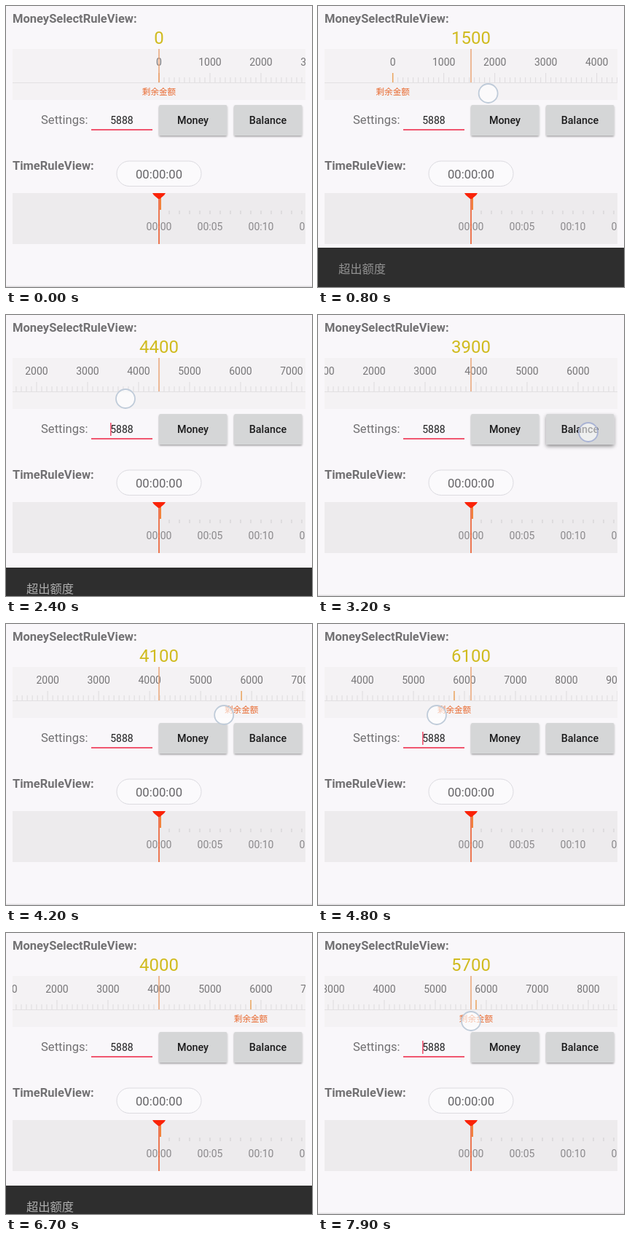
An HTML page for the animation above (8000 ms loop, 420x386 px).

```html
<!DOCTYPE html>
<html lang="en">
<head>
<meta charset="utf-8">
<title>Rule views</title>
<style>
  html, body { margin: 0; width: 100%; height: 100%; overflow: hidden; background: #f9f7fa; }
  svg { display: block; width: 420px; height: 386px; font-family: Roboto, sans-serif; }
  .mid { text-anchor: middle; }
  .title { font-size: 16.5px; font-weight: 700; fill: #727173; }
  .label { font-size: 14px; text-anchor: middle; fill: #777678; }
  .button { font-size: 14.3px; font-weight: 500; text-anchor: middle; fill: #1b1b1c; }
  .cjk { font-family: "Noto Sans CJK SC", "Noto Sans CJK", sans-serif; }
</style>
</head>
<body>
<svg viewBox="0 0 420 386">
  <defs>
    <clipPath id="moneyClip"><rect x="9" y="59" width="402" height="70"/></clipPath>
    <clipPath id="timeClip"><rect x="9" y="257" width="402" height="70"/></clipPath>
    <filter id="shadow" x="-10%" y="-20%" width="120%" height="150%">
      <feDropShadow dx="0" dy="1.5" stdDeviation="1.3" flood-color="#000" flood-opacity=".35"/>
    </filter>
    <filter id="raised" x="-10%" y="-20%" width="120%" height="150%">
      <feDropShadow dx="0" dy="2.5" stdDeviation="2.6" flood-color="#000" flood-opacity=".42"/>
    </filter>
  </defs>
  <rect width="420" height="386" fill="#f9f7fa"/>
  <rect y="384.5" width="420" height="1.5" fill="#dfdde0"/>

  <text class="title" x="9" y="23">MoneySelectRuleView:</text>
  <text id="value" class="mid" x="210" y="52" font-size="24" fill="#d0bb1f"></text>
  <rect x="9" y="59" width="402" height="70" fill="#f4f2f4"/>
  <g clip-path="url(#moneyClip)">
    <path d="M9 105.5H411" stroke="#e2e0e2"/>
    <path id="ticks" stroke="#dddbdd" fill="none"/>
    <g id="labels"></g>
    <g id="balance">
      <path d="M0 92V105" stroke="#eba45e" stroke-width="1.5"/>
      <text class="mid cjk" y="122" font-size="11.6" fill="#e8692f">剩余金额</text>
    </g>
    <path d="M210 59V105" stroke="#eba678" stroke-width="1.5"/>
  </g>

  <text x="48" y="162" font-size="16.6" fill="#727173">Settings:</text>
  <text class="mid" x="159" y="162" font-size="14" fill="#1f1f20">5888</text>
  <rect x="117" y="169" width="84" height="2" fill="#f0566f"/>
  <rect id="cursor" x="143" y="148" width="1.6" height="18" fill="#ee5570"/>
  <rect x="210" y="136" width="93.5" height="42" rx="2" fill="#d5d6d7" filter="url(#shadow)"/>
  <text class="button" x="256.5" y="162">Money</text>
  <rect id="balanceButton" x="313" y="136" width="93.5" height="42" rx="2" fill="#d5d6d7"/>
  <text class="button" x="359.5" y="162">Balance</text>

  <text class="title" x="9" y="225">TimeRuleView:</text>
  <rect x="152" y="213" width="116" height="34.5" rx="17.2" fill="#fbfafc" stroke="#dcdbe0"/>
  <text class="mid" x="210" y="236.500" font-size="16.6" fill="#656467">00:00:00</text>
  <rect x="9" y="257" width="402" height="70" fill="#edebed"/>
  <g clip-path="url(#timeClip)">
    <path id="minutes" stroke="#cfcdcf" fill="none"/>
    <g id="hours"></g>
    <path d="M212 262V280" stroke="#f1823c" stroke-width="2"/>
    <path d="M210 257V327" stroke="#ec5a2b" stroke-width="1.6"/>
    <path d="M201 257H219L217 260L211 265H209L203 260Z" fill="#fa2308"/>
  </g>

  <g id="snackbar">
    <rect y="331" width="420" height="56" fill="#2e2e2e"/>
    <text id="message" class="cjk" x="28" y="365.500" font-size="16.3" fill="#f3f3f3">超出额度</text>
  </g>
  <circle id="touch" r="13" fill="#fff" fill-opacity=".6" stroke="#bfcbd9" stroke-width="1.8"/>
</svg>
<script>
const LOOP = 8000, STEP = 100, CENTER = 210, SCALE = 0.07;
const $ = id => document.getElementById(id);
const set = (id, attrs) => {
  for (const [name, val] of Object.entries(attrs)) $(id).setAttribute(name, val);
};

function tween(keys, t) {
  const i = keys.findIndex(key => key[0] >= t);
  if (i === 0) return keys[0][1];
  if (i < 0) return keys[keys.length - 1][1];
  const [t0, a] = keys[i - 1], [t1, b] = keys[i];
  return a + (b - a) * (t - t0) / (t1 - t0);
}

const MONEY = [
  [300, 0], [400, 60], [700, 1100], [1000, 2400], [1300, 3371], [1600, 4200], [1900, 4600],
  [2200, 4600], [2700, 4100], [3100, 3900], [4100, 3900], [4400, 4750], [4800, 6129],
  [5000, 6400], [5700, 6400], [6100, 5000], [6400, 4120], [6600, 4000],
  [7300, 4000], [7400, 4080], [7900, 5700]
];
const CURSOR = [200, 800, 1400, 1900, 2400, 3000, 3500, 4200, 4700, 5200, 5700, 6300, 6900, 7400, 7900];

// x is the finger position when the ruler stands at the value "at".
const DRAGS = [
  { from: 400, to: 1400, x: 105, at: 3371, y: [108, 138] },
  { from: 2300, to: 2800, x: 150, at: 4600, y: [115, 115] },
  { from: 4200, to: 5000, x: 163, at: 6129, y: [125, 125] },
  { from: 5700, to: 6300, x: 127, at: 6400, y: [99, 108] },
  { from: 7400, to: 8000, x: 210, at: 5700, y: [121, 121] }
];
const TAP = { from: 3200, to: 3500, x: 371, y: [161, 161] };
const FADE = 200;

const SHOW = [[0, 55], [100, 24], [200, 4], [300, 1], [400, 0]];
const HIDE = [[0, 0], [100, 3], [200, 16], [300, 37], [400, 51], [500, 55]];
const SNACKS = [{ show: 500, hide: 2200 }, { show: 4800, hide: 6500 }];

const money = t => tween(MONEY, t);
const toX = (amount, v) => CENTER + (amount - v) * SCALE;

function drawMoney(t) {
  const v = money(t);
  $("value").textContent = Math.floor(v / 100 + 1e-6) * 100;
  let path = "", labels = "";
  const first = Math.max(0, Math.floor((v - 3300) / 100));
  const last = Math.ceil((v + 3300) / 100);
  for (let n = first; n <= last; n++) {
    const x = toX(n * 100, v).toFixed(2), major = n % 10 === 0;
    path += `M${x} ${major ? 92 : 98}V105`;
    if (major) labels += `<text class="label" x="${x}" y="82">${n * 100}</text>`;
  }
  set("ticks", { d: path });
  $("labels").innerHTML = labels;
  set("balance", { transform: `translate(${toX(t < 3400 ? 0 : 5800, v)} 0)` });
}

function drawTouch(t) {
  const g = [...DRAGS, TAP].find(d => t >= d.from && t < d.to + FADE);
  if (!g) return set("touch", { opacity: 0 });
  const held = Math.min(t, g.to);
  const x = g.at === undefined ? g.x : g.x + (g.at - money(held)) * SCALE;
  const y = g.y[0] + (g.y[1] - g.y[0]) * (held - g.from) / (g.to - g.from);
  set("touch", {
    cx: x, cy: y,
    opacity: 1 - (t - held) / FADE,
    stroke: g === TAP ? "#a9b3d4" : "#bfcbd9"
  });
}

function drawSnackbar(t) {
  const s = SNACKS.find(k => t > k.show && t < k.hide + 500);
  set("snackbar", { visibility: s ? "visible" : "hidden" });
  if (!s) return;
  const hiding = t > s.hide;
  const offset = hiding ? tween(HIDE, t - s.hide) : tween(SHOW, t - s.show);
  const alpha = hiding
    ? tween([[0, 1], [200, 0.65], [400, 0]], t - s.hide)
    : tween([[100, 0], [200, 0.25], [500, 1]], t - s.show);
  set("snackbar", { transform: `translate(0 ${offset})` });
  set("message", { opacity: alpha });
}

function draw(t) {
  drawMoney(t);
  drawTouch(t);
  drawSnackbar(t);
  const toggles = CURSOR.filter(time => time <= t).length;
  set("cursor", { opacity: toggles % 2 });
  const pressed = t >= TAP.from && t < TAP.to;
  set("balanceButton", { filter: `url(#${pressed ? "raised" : "shadow"})` });
}

function drawTimeScale() {
  let path = "", labels = "";
  for (let m = 0; m <= 15; m++) {
    const x = CENTER + m * 14;
    if (m) path += `M${x} 281V286`;
    if (m % 5 === 0) {
      const text = "00:" + String(m).padStart(2, "0");
      labels += `<text class="label" x="${x}" y="308" style="fill:#8b898c">${text}</text>`;
    }
  }
  set("minutes", { d: path });
  $("hours").innerHTML = labels;
}

const start = performance.now();
function frame() {
  const t = (performance.now() - start) % LOOP;
  draw(Math.floor(t / STEP) * STEP);
  requestAnimationFrame(frame);
}
drawTimeScale();
frame();
</script>
</body>
</html>
```
